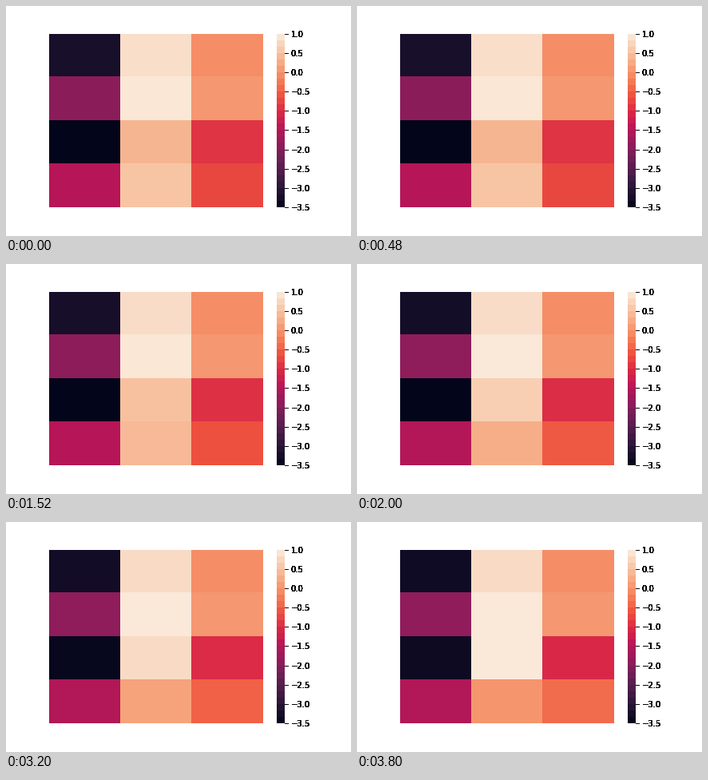
These frames come from a looping animation (432 by 288 pixels, 4000 ms). A matplotlib script:

```python
import matplotlib.pyplot as plt
import numpy as np
from matplotlib.animation import FuncAnimation
from matplotlib.colors import LinearSegmentedColormap

plt.rcParams.update({"font.family": "DejaVu Sans", "font.size": 10,
                     "text.kerning_factor": 6})

W, H, DPI = 432, 288, 72
VMIN, VMAX = -3.5, 1.0
STEP_MS, STEPS = 200, 20
CHANGES = [4, 10, 16, 19]  # steps at which the grid is updated
BANDS = 27
OVERDRAW = 12

HEX = ("#03051a #221331 #451c47 #691f55 #921c5b #b91657 "
       "#d92847 #ed503e #f47d57 #f6a47c #f7c9aa #faebdd").split()
ROCKET = LinearSegmentedColormap.from_list("rocket", HEX, N=256)

# First and last grid, as fractions of the colour scale
FIRST = np.array([[.065, .963, .762],
                  [.350, .985, .786],
                  [-.04, .857, .572],
                  [.448, .895, .615],])
LAST = np.array([[.042, .954, .762],
                 [.361, .992, .786],
                 [.033, .989, .545],
                 [.438, .785, .690]])

fig = plt.figure(figsize=(W / DPI, H / DPI), dpi=DPI, facecolor="white")


def add_axes(left, top, right, bottom, **kw):
    """Axes from a box in pixels, measured from the top left corner."""
    box = [left / W, 1 - bottom / H, (right - left) / W, (bottom - top) / H]
    return fig.add_axes(box, **kw)


def draw_heatmap():
    ax = add_axes(54, 35, 322, 252)
    cols = np.floor(np.linspace(54, 322, 4))
    rows = np.floor(np.linspace(34.56, 252, 5))
    mesh = ax.pcolormesh(cols, rows, FIRST, cmap=ROCKET, vmin=0, vmax=1)
    ax.set(xlim=(54, 322), ylim=(252, 35))
    ax.axis("off")
    return mesh


def draw_colorbar():
    box = 338.58, 34.56, 349.45, 252
    edges = np.linspace(VMIN, VMAX, BANDS + 1)
    mids = (edges[:-1] + edges[1:]) / 2
    bar = add_axes(*box)
    bar.pcolormesh([0, 1], edges, mids[:, None], cmap=ROCKET,
                   vmin=VMIN, vmax=VMAX)
    # Stacked axes give the heavy, repeatedly inked tick labels
    for k in range(OVERDRAW):
        ax = add_axes(*box, label=f"ticks {k}") if k else bar
        ax.patch.set_visible(False)
        ax.spines[:].set_visible(False)
        ax.set_xticks([])
        ax.set_ylim(VMIN, VMAX)
        ax.set_yticks(np.arange(VMIN, VMAX + 0.1, 0.5))
        ax.yaxis.set_major_formatter("{x:.1f}")
        ax.yaxis.tick_right()


cells = draw_heatmap()
draw_colorbar()


def update(step):
    done = np.searchsorted(CHANGES, step, side="right") / len(CHANGES)
    cells.set_array(FIRST + (LAST - FIRST) * done)
    return [cells]


anim = FuncAnimation(fig, update, frames=STEPS, interval=STEP_MS,
                     repeat=True, repeat_delay=0)
plt.show()
```
